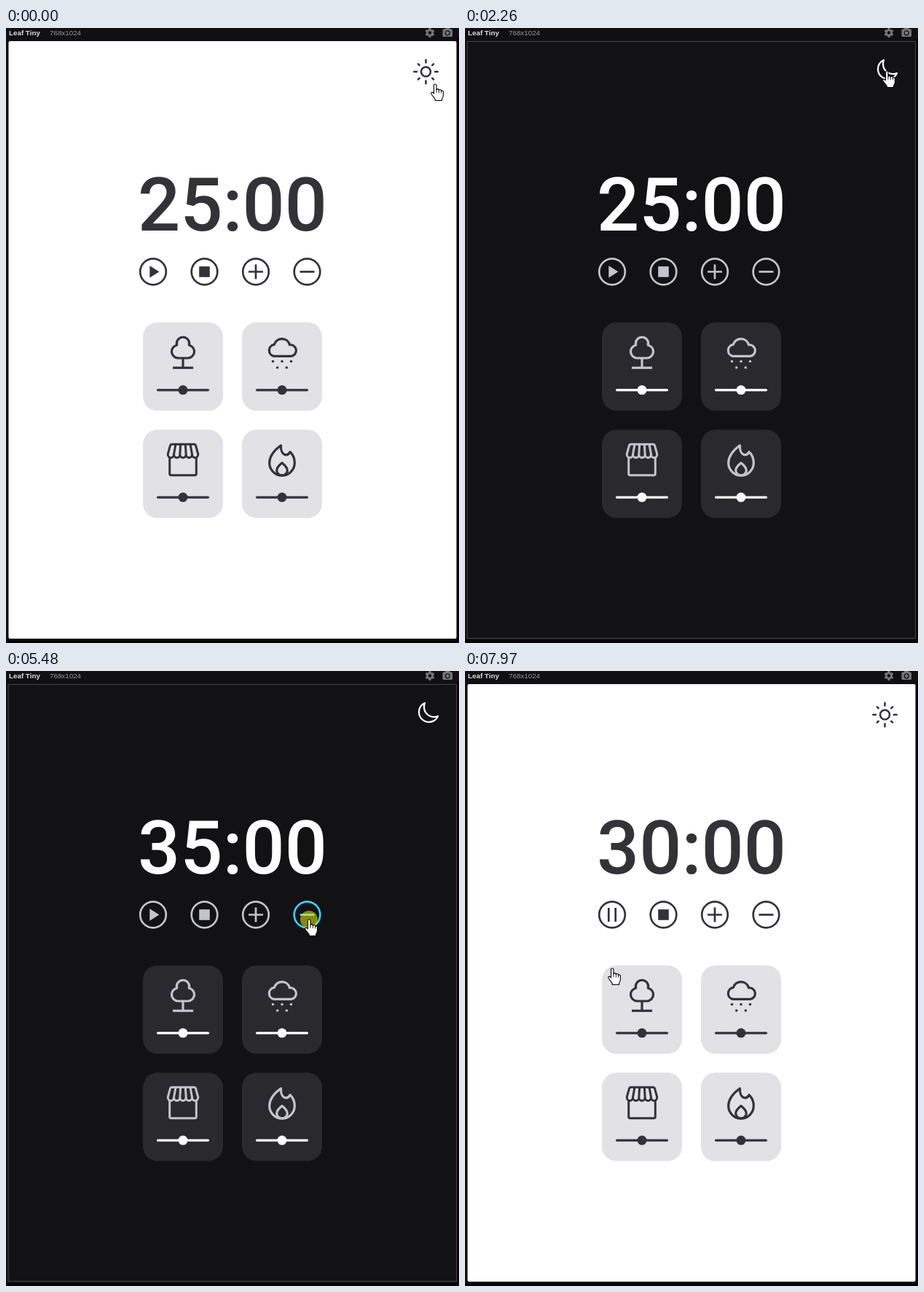
Write an HTML page with a canvas that moves like this. It is 622 by 844 pixels and loops after 8000 ms.

```html
<!DOCTYPE html>
<html lang="en">
<head>
<meta charset="utf-8">
<title>Focus timer</title>
<style>
html, body { margin: 0; width: 100%; height: 100%; overflow: hidden; background: #101012; }
canvas { display: block; width: 622px; height: 844px; }
</style>
</head>
<body>
<canvas id="stage" width="622" height="844"></canvas>
<script>
const ctx = document.getElementById('stage').getContext('2d');
const LOOP = 8000, TAU = Math.PI * 2, ACCENT = '#38d1fb';
const LIGHT = { page: '#ffffff', card: '#e1e1e6', text: '#323238', icon: '#323238' };
const DARK = { page: '#121214', card: '#29292e', text: '#ffffff', icon: '#c4c4cc' };

// [time, value]: the value holds until the next entry
const darkKeys = [[0, false], [470, true], [1130, false], [2260, true], [6550, false]];
const minuteKeys = [[0, 25], [4070, 30], [4330, 35], [4590, 40], [5200, 35], [5550, 30]];
const presses = [[330, 470], [1060, 1130], [2120, 2260], [4000, 4070], [4260, 4330],
  [4470, 4590], [5130, 5200], [5480, 5550], [6480, 6550], [7380, 7440]];
const PLAY_AT = 7440;

// Pointer moves: start, end, number of steps, corner points
const moves = [
  [70, 200, 3, [[589, 77], [579, 59]]],
  [3460, 3930, 8, [[579, 59], [343, 375], [344, 334]]],
  [4660, 5060, 7, [[344, 334], [427, 341], [416, 341]]],
  [5620, 6160, 9, [[416, 341], [591, 57]]],
  [6350, 6420, 2, [[591, 57], [583, 58]]],
  [6690, 7310, 10, [[583, 58], [443, 287], [226, 354], [203, 336]]],
  [7560, 7970, 7, [[203, 336], [168, 366], [202, 408]]]
];

const buttons = [202, 272.5, 343, 413.5];
const BUTTON_Y = 334.5;

const valueAt = (keys, t) => keys.filter(k => k[0] <= t).pop()[1];

function along(points, p) {
  const lengths = points.slice(1).map((q, i) => Math.hypot(q[0] - points[i][0], q[1] - points[i][1]));
  let rest = p * lengths.reduce((a, b) => a + b, 0);
  for (let i = 0; i < lengths.length; i++) {
    if (rest <= lengths[i]) {
      const f = rest / lengths[i], a = points[i], b = points[i + 1];
      return [a[0] + (b[0] - a[0]) * f, a[1] + (b[1] - a[1]) * f];
    }
    rest -= lengths[i];
  }
  return points[points.length - 1];
}

function pointerAt(t) {
  const move = moves.filter(m => m[0] <= t).pop();
  if (!move) return moves[0][3][0];
  const [start, end, steps, points] = move;
  const done = Math.floor((t - start) / (end - start) * (steps - 1) + 0.01) + 1;
  const p = Math.min(1, done / steps);
  return along(points, p * p * (3 - 2 * p));
}

function stroke(d, color, width) {
  ctx.strokeStyle = color;
  ctx.lineWidth = width;
  ctx.stroke(new Path2D(d));
}

function disc(x, y, r, color) {
  ctx.fillStyle = color;
  ctx.beginPath();
  ctx.arc(x, y, r, 0, TAU);
  ctx.fill();
}

function ring(x, y, r, color, width) {
  ctx.strokeStyle = color;
  ctx.lineWidth = width;
  ctx.beginPath();
  ctx.arc(x, y, r, 0, TAU);
  ctx.stroke();
}

function box(x, y, w, h, r, color) {
  ctx.fillStyle = color;
  ctx.beginPath();
  ctx.roundRect(x, y, w, h, r);
  ctx.fill();
}

function at(x, y, draw) {
  ctx.save();
  ctx.translate(x, y);
  draw();
  ctx.restore();
}

function label(text, x, y, font, color) {
  ctx.font = font;
  ctx.fillStyle = color;
  ctx.fillText(text, x, y);
}

function drawBar() {
  const grey = '#77777a';
  label('Leaf Tiny', 4, 10, 'bold 9.8px "Liberation Sans", Arial, sans-serif', '#dededf');
  label('768x1024', 60, 10, '9.8px "Liberation Sans", Arial, sans-serif', '#99999b');
  at(582, 6.5, () => {
    ring(0, 0, 3.6, grey, 2.8);
    for (let i = 0; i < 6; i++) {
      ctx.rotate(TAU / 6);
      box(-1.6, -6.4, 3.2, 2.6, 0.5, grey);
    }
  });
  box(599.5, 1.5, 13.5, 10.5, 1.5, grey);
  box(603, 0, 6.5, 4, 1, grey);
  ring(606.2, 6.8, 3, '#121214', 1.2);
}

function drawPage(dark, look) {
  ctx.fillStyle = '#101012';
  ctx.fillRect(0, 0, 622, 844);
  ctx.fillStyle = '#040405';
  ctx.fillRect(0, 840, 622, 4);
  ctx.fillRect(620, 14, 2, 830);
  box(3.5, 18, 615, 820, 2, look.page);
  if (dark) {
    ctx.strokeStyle = '#454547';
    ctx.lineWidth = 1;
    ctx.strokeRect(3.5, 18.5, 615, 819);
  }
}

function drawSun(color) {
  at(576.5, 60, () => {
    ring(0, 0, 6.5, color, 2.5);
    for (let i = 0; i < 8; i++) {
      stroke(i % 2 ? 'M0 -12.4V-15' : 'M0 -12.5V-16.2', color, 2.5);
      ctx.rotate(TAU / 8);
    }
  });
}

function drawMoon(color) {
  at(564, 41, () => {
    ctx.scale(1 / 16, 1 / 16);
    stroke('M160 136c0-30.6 4.5-61.6 16-88C99.6 81.3 48 159.3 48 248c0 119.3 96.7 216 216 216' +
      ' 88.7 0 166.7-51.6 200-128-26.4 11.5-57.4 16-88 16-119.3 0-216-96.7-216-216z', color, 36);
  });
}

function drawButtons(look, playing, px, py) {
  buttons.forEach((x, i) => {
    const hover = Math.hypot(px - x, py - BUTTON_Y) < 19;
    const color = hover ? ACCENT : look.icon;
    at(x, BUTTON_Y, () => {
      ctx.lineCap = 'butt';
      ring(0, 0, 17.8, color, 2.7);
      ctx.fillStyle = color;
      if (i === 0 && playing) stroke('M-4.7 -9.5V9.5M4.7 -9.5V9.5', color, 2.7);
      else if (i === 0) ctx.fill(new Path2D('M-4.7 -8.3L8.4 0L-4.7 8.3Z'));
      else if (i === 1) ctx.fillRect(-7.3, -7.3, 14.6, 14.6);
      else stroke(i === 2 ? 'M-10 0H10M0 -10V10' : 'M-10 0H10', color, 2.7);
      ctx.lineCap = 'round';
    });
  });
}

// Icons are drawn around the middle of the card, from its top edge
function tree(color) {
  stroke('M-7 49A9 9 0 0 1 -8.4 31.2A8.7 8.7 0 1 1 8.4 31.2A9 9 0 0 1 7 49ZM0 49V62', color, 3.2);
  ctx.lineCap = 'butt';
  stroke('M-14 62.3H14', color, 3.2);
  ctx.lineCap = 'round';
}

function rain(color) {
  stroke('M-11 46.4A8.1 8.1 0 0 1 -10.6 30.4A11 11 0 0 1 10.6 30.8A7.8 7.8 0 0 1 12.5 46.4Z', color, 3.2);
  for (const x of [-12.5, 0, 12.5]) disc(x, 53.6, 1.75, color);
  for (const x of [-6.3, 6.3]) disc(x, 62, 1.75, color);
}

function shop(color) {
  let d = 'M-20.3 35V14Q-20.3 14 -17 20.5';
  d = 'M-18.3 38V60.5Q-18.3 62.4 -16.4 62.4H16.4Q18.3 62.4 18.3 60.5V38';
  d += 'M-20.8 33.5L-17.5 21.5Q-17 20 -15.5 20H15.5Q17 20 17.5 21.5L20.8 33.5';
  for (let i = 0; i < 5; i++) {
    const x = -20.8 + i * 8.32;
    d += `M${x} 33.5C${x} 40.2 ${x + 8.32} 40.2 ${x + 8.32} 33.5`;
    if (i) d += `M${x} 33.5L${x * 0.8} 20`;
  }
  stroke(d, color, 3);
}

function fire(color) {
  stroke('M-1.5 21.5C-9 27 -17.3 35 -17.3 45.5A17.2 17.2 0 0 0 17.3 45.5' +
    'C17.3 39 14.8 34 11 30.5C9.5 33.5 7 35 4.8 34.5C0 33.5 -1.8 27.5 -1.5 21.5Z', color, 3.2);
  stroke('M0 45.5C-3.5 48.5 -7.3 51.5 -7.3 55.7A7.3 7 0 0 0 7.3 55.7C7.3 51.5 3.5 48.5 0 45.5Z', color, 3.2);
}

function drawCards(look) {
  [tree, rain, shop, fire].forEach((icon, i) => {
    at(243 + (i % 2) * 136, i < 2 ? 404 : 551.3, () => {
      box(-55, 0, 110, 121.3, 20, look.card);
      icon(look.icon);
      stroke('M-34.5 92.8H34.5', look.text, 3.2);
      disc(0, 92.8, 6.5, look.text);
    });
  });
}

function drawHand(x, y) {
  at(x, y, () => {
    const hand = new Path2D('M-1.5 13V1.5Q-1.5 0 0.2 0Q2 0 2 1.5V7.8Q2.4 6.4 3.9 6.6Q5.4 6.8 5.4 8.4' +
      'Q5.8 7.2 7.2 7.5Q8.6 7.8 8.6 9.4Q9 8.6 10.2 9Q11.4 9.4 11.4 10.8V15.5' +
      'Q11.2 18 9.6 20V22.5H0.2V20.6L-4.8 14Q-6 12.3 -4.8 11.4Q-3.6 10.8 -2.6 11.8Z');
    ctx.fillStyle = '#fff';
    ctx.fill(hand);
    ctx.strokeStyle = '#000';
    ctx.lineWidth = 1.1;
    ctx.stroke(hand);
    stroke('M2 7.8V11.5M5.4 8.4V11.8M8.6 9.4V12', '#000', 0.9);
  });
}

function draw(t) {
  const dark = valueAt(darkKeys, t);
  const look = dark ? DARK : LIGHT;
  const [px, py] = pointerAt(t);
  ctx.lineCap = ctx.lineJoin = 'round';
  drawPage(dark, look);
  drawBar();
  if (dark) drawMoon(look.text);
  else drawSun(look.text);
  ctx.textAlign = 'center';
  label(valueAt(minuteKeys, t) + ':00', 311, 278, '500 102.4px Roboto, sans-serif', look.text);
  ctx.textAlign = 'left';
  drawButtons(look, t >= PLAY_AT, px, py);
  drawCards(look);
  if (presses.some(([a, b]) => t >= a && t < b)) disc(px, py, 12, 'rgba(255,255,0,0.5)');
  drawHand(px, py);
}

const start = performance.now();
function tick() {
  draw((performance.now() - start) % LOOP);
  requestAnimationFrame(tick);
}
tick();
</script>
</body>
</html>
```
